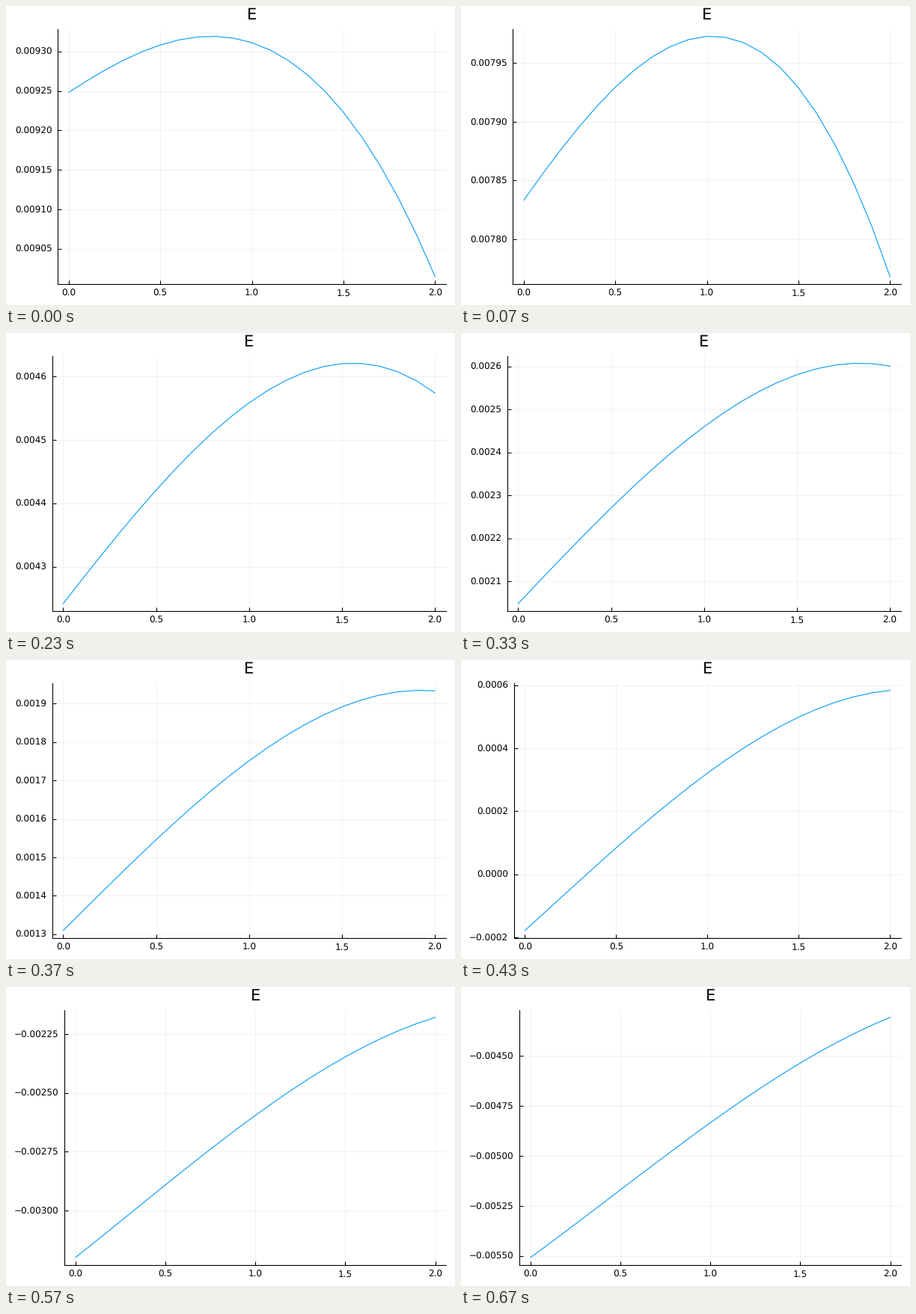
A matplotlib script that plays this animation: 600x400 px, repeating every 0.71 s.

```python
import math

import matplotlib.pyplot as plt
import numpy as np
from matplotlib.animation import FuncAnimation

W, H, DPI = 600, 400, 100
TOP, BOTTOM, RIGHT = 31.0, 371.5, 588.0
PX = 72 / DPI  # points per pixel
BLUE = "#009afa"
STEPS = 21
TICKS_10MS = 71
X = np.linspace(0, 2, 21)


def energy(k):
    """Curve at time step k: quartic in x, its coefficients drift with k."""
    s = 2 * X
    start = 924.82 - 70.457 * k - 0.1425 * k**2 - 0.00118 * k**3
    slope = 6.0 + 1.86 * k - 0.0234 * k**2
    bend = -5.71 + 0.197 * k + 0.0037 * k**2
    cubic = -3.4
    quartic = 0.53 - 0.07 * k + 0.0023 * k**2
    e = start + slope * s + bend * s * (s - 1) / 2
    e += cubic * s * (s - 1) * (s - 2) / 6
    e += quartic * s * (s - 1) * (s - 2) * (s - 3) / 24
    return e * 1e-5


def nice_ticks(lo, hi, k_min=4, k_max=8, k_ideal=5):
    """Pick round ticks by granularity, zero, coverage and niceness."""
    nice = [(1, 1.0), (5, 0.9), (2, 0.7), (2.5, 0.5), (3, 0.2)]
    span = hi - lo
    slack = 0.003 * span
    best, best_score = [], -math.inf
    z = math.ceil(math.log10(span))
    while 2 * k_max * 10.0 ** (z + 1) > span:
        for k in range(k_min, 2 * k_max + 1):
            for q, q_score in nice:
                step = q * 10.0 ** z
                full = (k - 1) * step
                r = math.ceil((hi - full) / step - 1e-9)
                while r * step <= lo:
                    ticks = [(r + i) * step for i in range(k)]
                    ticks = [t for t in ticks if lo - slack <= t <= hi + slack]
                    n = len(ticks)
                    if k_min <= n <= k_max:
                        grain = 1 - abs(n - k_ideal) / k_ideal
                        zero = r <= 0 and abs(r) < k
                        cover = 1.5 * span / ((n - 1) * step)
                        score = grain / 4 + zero / 6 + cover / 3 + q_score / 4
                        score -= 10000 * (full > span)
                        score -= 1000 * (full >= 2 * span)
                        if score > best_score + 1e-9:
                            best, best_score = ticks, score
                    r += 1
        z -= 1
    return best


def decimals(ticks):
    for d in range(1, 8):
        if all(abs(t * 10 ** d - round(t * 10 ** d)) < 1e-6 for t in ticks):
            return d
    return 8


def label(value, digits):
    text = f"{abs(value):.{digits}f}"
    return "\u2212" + text if value < -1e-9 else text


plt.rcParams["font.family"] = "DejaVu Sans"
plt.rcParams["text.hinting"] = "none"
fig = plt.figure(figsize=(W / DPI, H / DPI), dpi=DPI, facecolor="white")
ax = fig.add_axes([0, 0, 1, 1])
ax.set_xlim(0, W)
ax.set_ylim(H, 0)
ax.axis("off")


def line(xs, ys, color="black", width=1.1, **kw):
    ax.plot(xs, ys, color=color, lw=width * PX, **kw)


def write(x, y, text, size=12, ha="center"):
    ax.text(x, y, text, fontsize=size * PX, ha=ha, va="baseline", color="black")


def draw(tick):
    for artist in [*ax.lines, *ax.texts]:
        artist.remove()

    # Steps last a thirtieth of a second, rounded to 10 ms.
    step = min(int(0.3 * tick + 0.15), STEPS - 1)
    e = energy(step)
    pad = 0.03 * np.ptp(e)
    lo, hi = e.min() - pad, e.max() + pad
    ticks = nice_ticks(lo, hi)
    digits = decimals(ticks)
    # The left axis makes room for the widest label.
    left = 61.6 + 7.6 * (digits - 4) + 9.2 * (min(ticks) < -1e-9)

    def px(x):
        return left + (RIGHT - left) * (x + 0.06) / 2.12

    def py(v):
        return BOTTOM - (BOTTOM - TOP) * (v - lo) / (hi - lo)

    for x in np.linspace(0, 2, 5):
        p = px(x)
        line([p, p], [TOP, BOTTOM], width=1, alpha=0.05)
        line([p, p], [BOTTOM, BOTTOM - 5], solid_capstyle="butt")
        write(p, 387.7, f"{x:.1f}")
    for v in ticks:
        p = py(v)
        line([left, RIGHT], [p, p], width=1, alpha=0.05)
        line([left, left + 5], [p, p], solid_capstyle="butt")
        write(left - 7.7, p + 4.4, label(v, digits), ha="right")

    line([left, left], [TOP, BOTTOM])
    line([left, RIGHT], [BOTTOM, BOTTOM])
    line(px(X), py(e), BLUE)
    write((left + RIGHT) / 2, 18.2, "E", 21)


anim = FuncAnimation(fig, draw, frames=TICKS_10MS, interval=10,
                     init_func=lambda: None, repeat=True)
plt.show()
```
